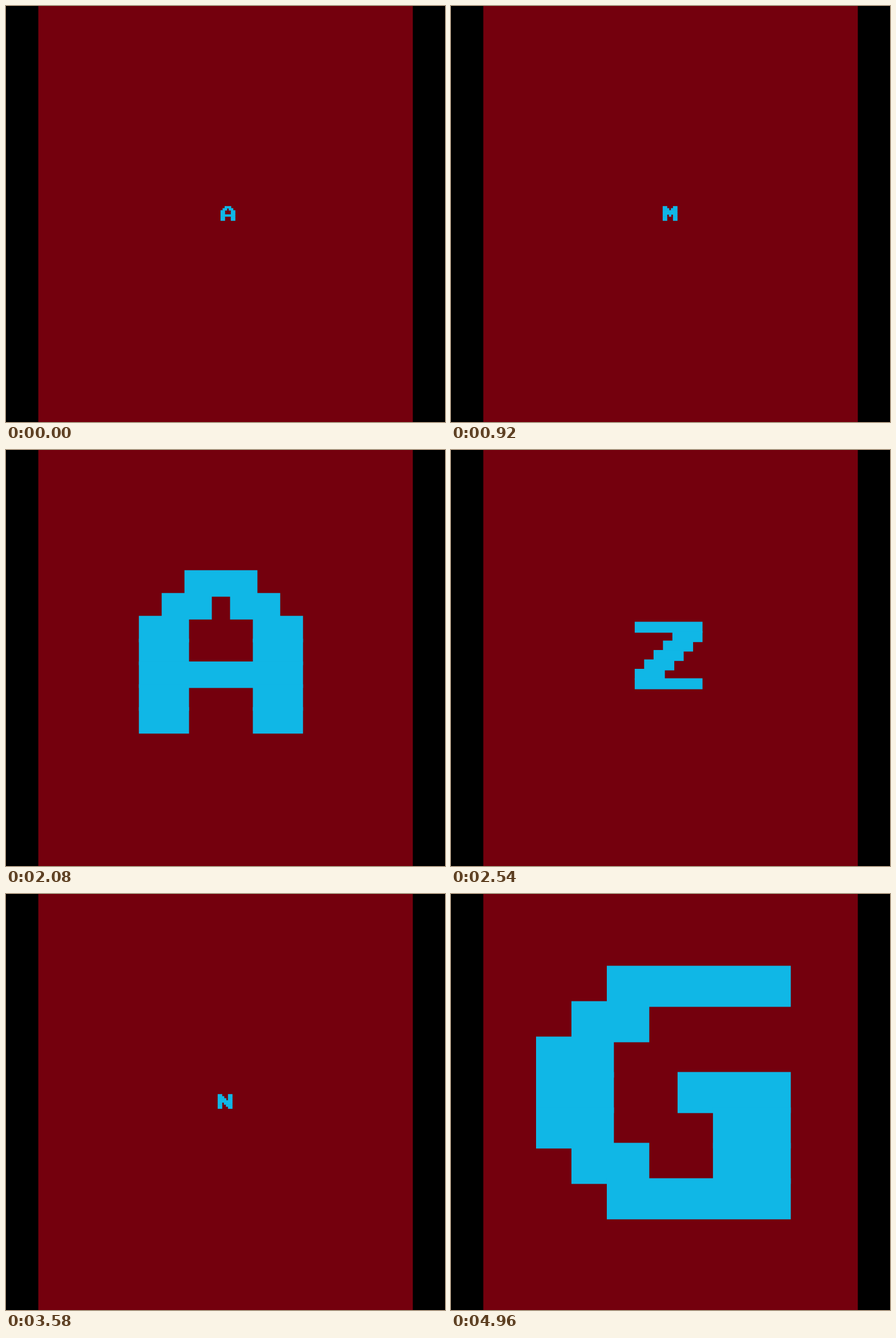
An HTML page with a canvas that plays this animation: 769x728 px, repeating every 5 s.

```html
<!DOCTYPE html>
<html lang="en">
<head>
<meta charset="utf-8">
<title>Amazing</title>
<style>
  html, body { margin: 0; width: 100%; height: 100%; overflow: hidden; background: #000; }
  canvas { display: block; }
</style>
</head>
<body>
<canvas width="769" height="728" role="img" aria-label="AMAZING"></canvas>
<script>
const ctx = document.querySelector('canvas').getContext('2d');

const LOOP = 5000, FRAMES = 120;
const MIN_CELL = 3.6, MAX_CELL = 68.6;

// 7 x 7 pixel letters
const glyphs = {
  A: '0011100 0110110 1100011 1100011 1111111 1100011 1100011',
  M: '1100011 1110111 1111111 1111111 1101011 1100011 1100011',
  Z: '1111111 0000111 0001110 0011100 0111000 1110000 1111111',
  I: '0111111 0001100 0001100 0001100 0001100 0001100 0111111',
  N: '1100011 1110011 1111011 1111111 1101111 1100111 1100011',
  G: '0011111 0110000 1100000 1100111 1100011 0110011 0011111',
};

const linear = x => x;

// Straight departure, soft arrival: cubic-bezier(.167, .167, .667, 1)
function settle(x) {
  const bezier = (u, p, q) => 3 * (1 - u) ** 2 * u * p + 3 * (1 - u) * u * u * q + u ** 3;
  let low = 0, high = 1;
  for (let i = 0; i < 24; i++) {
    const mid = (low + high) / 2;
    if (bezier(mid, 0.167, 0.667) < x) low = mid; else high = mid;
  }
  return bezier(low, 0.167, 1);
}

// show: first frame on screen; grow: frame where growth starts; span: frames to full size
const letters = [
  { char: 'A', show: 0, grow: 0, span: 25.3, ease: linear, shift: 5 },
  { char: 'M', show: 22, grow: 22, span: 23.7 },
  { char: 'A', show: 39, grow: 40, span: 23 },
  { char: 'Z', show: 58, grow: 58, span: 18.9 },
  { char: 'I', show: 71, grow: 72, span: 17.7 },
  { char: 'N', show: 86, grow: 87, span: 17.9 },
  { char: 'G', show: 103, grow: 104, span: 19.6 },
];

function drawGlyph(char, cell, shift) {
  const left = 384.5 + shift - 3.7 * cell;
  const top = 364 - 3.767 * cell;
  const growX = 0.1 * cell, growY = 0.08 * cell;
  ctx.fillStyle = '#10b7e6';
  glyphs[char].split(' ').forEach((row, y) => {
    for (const run of row.matchAll(/1+/g)) {
      ctx.fillRect(left + run.index * cell - growX, top + y * cell - growY,
        run[0].length * cell + 2 * growX, cell + 2 * growY);
    }
  });
}

function draw(time) {
  const frame = Math.floor((time % LOOP + 4) * FRAMES / LOOP) % FRAMES;
  const { char, grow, span, ease = settle, shift = 0 } = letters.findLast(l => l.show <= frame);
  const progress = Math.min(1, Math.max(0, (frame - grow) / span));

  ctx.fillStyle = '#000';
  ctx.fillRect(0, 0, 769, 728);
  ctx.fillStyle = '#74000d';
  ctx.fillRect(56.6, 0, 656, 728);
  drawGlyph(char, MIN_CELL + (MAX_CELL - MIN_CELL) * ease(progress), shift);
}

const start = performance.now();
function tick() {
  draw(performance.now() - start);
  requestAnimationFrame(tick);
}
tick();
</script>
</body>
</html>
```
